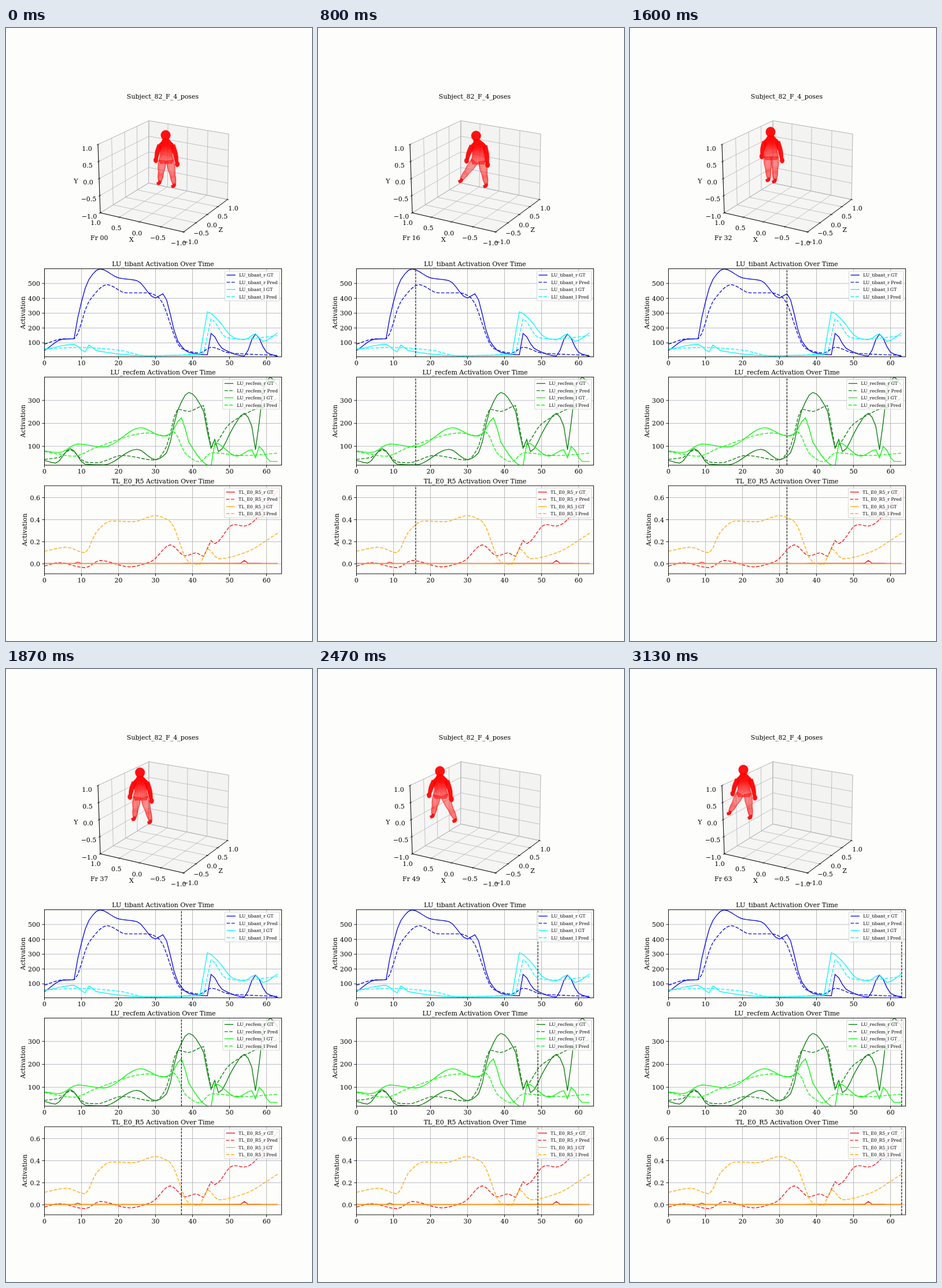
An HTML page for the animation above (3200 ms loop, 529 by 1058 pixels).

```html
<!DOCTYPE html>
<html lang="en">
<head>
<meta charset="utf-8">
<title>Muscle activation</title>
<style>
  html, body { margin: 0; width: 100%; height: 100%; overflow: hidden; background: #fdfdfc; }
  svg { display: block; }
  text { font: 11px "DejaVu Serif", "Noto Serif", serif; }
  .small { font-size: 7.7px; }
</style>
</head>
<body>
<svg id="stage" width="100%" height="100%" viewBox="0 0 529 1058">
  <linearGradient id="skin" x2="0" y2="1">
    <stop offset=".3" stop-color="#f00" stop-opacity=".9"/>
    <stop offset=".65" stop-color="#f00" stop-opacity=".5"/>
    <stop offset="1" stop-color="#f00" stop-opacity=".15"/>
  </linearGradient>
</svg>
<script>
const stage = document.getElementById('stage');

function add(parent, tag, attrs, content) {
  const node = document.createElementNS('http://www.w3.org/2000/svg', tag);
  for (const key in attrs) node.setAttribute(key, attrs[key]);
  if (content !== undefined) node.textContent = content;
  return parent.appendChild(node);
}
const label = (x, y, content, anchor = 'middle', attrs = {}) =>
  add(stage, 'text', { x, y, 'text-anchor': anchor, ...attrs }, content);
const polyline = pts => 'M' + pts.map(p => p[0].toFixed(2) + ' ' + p[1].toFixed(2)).join('L');
const stroke = (parent, d, color, width, attrs = {}) =>
  add(parent, 'path', { d, stroke: color, 'stroke-width': width, fill: 'none', ...attrs });
const mix = (p, q, t) => p.map((v, i) => v + (q[i] - v) * t);
const signed = v => v.toFixed(1).replace('-', '\u2212');

// Monotone cubic curve through [x, y] points.
function curve(points) {
  const last = points.length - 1;
  const secant = points.slice(1).map(([x, y], i) => (y - points[i][1]) / (x - points[i][0]));
  const slope = points.map((_, i) => {
    if (i === 0 || i === last) return secant[Math.min(i, last - 1)];
    const a = secant[i - 1], b = secant[i];
    return a * b > 0 ? 2 * a * b / (a + b) : 0;
  });
  return x => {
    let i = 0;
    while (i < last - 1 && x > points[i + 1][0]) i++;
    const [x0, y0] = points[i], [x1, y1] = points[i + 1], h = x1 - x0, t = (x - x0) / h, u = 1 - t;
    return u * u * ((1 + 2 * t) * y0 + t * h * slope[i]) + t * t * ((1 + 2 * u) * y1 - u * h * slope[i + 1]);
  };
}

// ---------- 3D axes ----------
const corner = {
  leftTop: [159, 201], backTop: [247, 160], rightTop: [385, 183],
  left: [163, 319], back: [246.5, 267.5], right: [383, 296], front: [307, 352]
};
// Five tick points along an edge; ratio sets the foreshortening.
const ticksOn = (a, b, ratio) => [0, .25, .5, .75, 1].map(t =>
  mix(corner[a], corner[b], t / (t + (1 - t) * ratio)));

function drawBox() {
  const pane = (names, fill) => add(stage, 'path', {
    d: polyline(names.map(n => corner[n])) + 'Z', fill, stroke: '#d4d4d4', 'stroke-width': 1 });
  pane(['leftTop', 'backTop', 'back', 'left'], '#f6f6f4');
  pane(['backTop', 'rightTop', 'right', 'back'], '#f3f3f2');
  pane(['left', 'back', 'right', 'front'], '#f5f5f4');

  const yLeft = ticksOn('leftTop', 'left', 1), yBack = ticksOn('backTop', 'back', 1),
        yRight = ticksOn('rightTop', 'right', 1),
        xFront = ticksOn('left', 'front', 1.12), xBack = ticksOn('back', 'right', 1.06),
        xTop = ticksOn('backTop', 'rightTop', 1.06),
        zFront = ticksOn('front', 'right', .86), zBack = ticksOn('left', 'back', .91),
        zTop = ticksOn('leftTop', 'backTop', .91);
  const tick = ([x, y], dx, dy) => stroke(stage, polyline([[x - dx, y - dy], [x + dx, y + dy]]), '#000', .8);

  for (let i = 0; i < 5; i++)
    for (const line of [[yLeft[i], yBack[i], yRight[i]], [xFront[i], xBack[i], xTop[i]], [zFront[i], zBack[i], zTop[i]]])
      stroke(stage, polyline(line), '#b4b4bc', .8);
  stroke(stage, polyline(['leftTop', 'left', 'front', 'right'].map(n => corner[n])), '#000', .95);
  for (let i = 0; i < 5; i++) {
    const value = signed(1 - i / 2);
    tick(yLeft[i], 2, -1);
    tick(xFront[i], 1.6, -1.2);
    tick(zFront[i], 2, .6);
    label(140 + i, 211.5 + 29.3 * i, value);
    label(155 + 35.8 * i, 340 + 8.75 * i, value);
    label(393 - 18.5 * i, 315 + 14.4 * i, value);
  }
  label(271, 122, 'Subject_82_F_4_poses');
  label(121, 268, 'Y');
  label(217, 369, 'X');
  label(371, 352, 'Z');
}

// ---------- charts ----------
const LEFT = 66.5, WIDTH = 410, HEIGHT = 152, STEP = 6.4, LAST = 63;
const cursors = [];

function drawChart({ top, muscle, zero, unit, tickStep, tickFrom, tickTo, labelX, legendX, colors, series }) {
  const bottom = top + HEIGHT, yOf = v => zero - v * unit;
  const plot = add(stage, 'svg', { x: LEFT, y: top, width: WIDTH, height: HEIGHT,
    viewBox: [LEFT, top, WIDTH, HEIGHT].join(' ') });

  for (let v = 0; v <= 60; v += 10) {
    const x = LEFT + v * STEP;
    stroke(plot, `M${x} ${top}V${bottom}`, '#b4b4b0', .9);
    stroke(stage, `M${x} ${bottom}v4`, '#000', .9);
    label(x, bottom + 14.7, v);
  }
  for (let v = tickFrom; v < tickTo + tickStep / 2; v += tickStep) {
    const y = yOf(v);
    stroke(plot, `M${LEFT} ${y}h${WIDTH}`, '#b4b4c4', .9);
    stroke(stage, `M${LEFT} ${y}h-4`, '#000', .9);
    label(59, y + 4, tickStep < 1 ? v.toFixed(1) : v, 'end');
  }

  const styles = series.map((_, i) =>
    [colors[i >> 1], 1.4, i % 2 ? { 'stroke-dasharray': '5.8 2.5' } : {}]);
  series.forEach((points, i) => {
    const valueAt = curve(points);
    const pts = Array.from({ length: LAST + 1 }, (_, x) => [LEFT + x * STEP, yOf(valueAt(x))]);
    stroke(plot, polyline(pts), ...styles[i]);
  });
  cursors.push(stroke(plot, `M${LEFT} ${bottom}V${top}`, '#000', 1.1, { 'stroke-dasharray': '4.07 1.76' }));
  add(stage, 'rect', { x: LEFT, y: top, width: WIDTH, height: HEIGHT, fill: 'none', stroke: '#000', 'stroke-width': .9 });

  add(stage, 'rect', { x: legendX, y: top + 4, width: 472.7 - legendX, height: 51.5, rx: 1.5,
    fill: '#fff', 'fill-opacity': .8, stroke: '#ccc', 'stroke-opacity': .8, 'stroke-width': 1 });
  ['r GT', 'r Pred', 'l GT', 'l Pred'].forEach((name, i) => {
    const y = top + 11 + 12.4 * i;
    stroke(stage, `M${legendX + 3.1} ${y}h15.4`, ...styles[i]);
    label(legendX + 24.7, y + 2.8, `${muscle}_${name}`, 'start', { class: 'small' });
  });
  label(LEFT + WIDTH / 2, top - 4.5, muscle + ' Activation Over Time');
  label(0, 0, 'Activation', 'middle', { transform: `translate(${labelX} ${top + HEIGHT / 2}) rotate(-90)` });
}

// Each series: a few turning points [frame, activation].
const charts = [{
  top: 415.5, muscle: 'LU_tibant', zero: 569.1, unit: .2563, tickFrom: 100, tickTo: 500, tickStep: 100,
  labelX: 33, legendX: 378.3, colors: ['#1414dc', '#14f5ff'],
  series: [
    [[0, 48], [5, 125], [8, 128], [9, 270], [12, 527], [15, 598], [20, 538], [25, 519], [30, 402], [32, 431],
      [36, 114], [39, 36], [44, 20], [45, 164], [48, 63], [54, 12], [57, 160], [60, 36], [63, 8]],
    [[0, 92], [5, 127], [8, 128], [12, 379], [17, 492], [22, 437], [28, 437], [31, 402], [37, 63], [42, 32],
      [45, 71], [50, 32], [63, 15]],
    [[0, 55], [8, 90], [11, 40], [12, 86], [14, 48], [27, 14], [42, 20], [44, 309], [47, 250], [51, 137], [54, 121],
      [57, 160], [59, 110], [63, 168]],
    [[0, 60], [10, 69], [20, 51], [28, 12], [43, 30], [45, 262], [49, 137], [53, 125], [63, 149]]
  ]
}, {
  top: 602.5, muscle: 'LU_recfem', zero: 761.6, unit: .396, tickFrom: 100, tickTo: 300, tickStep: 100,
  labelX: 33, legendX: 374.6, colors: ['#148214', '#14f514'],
  series: [
    [[0, 39], [3, 27], [7, 90], [11, 22], [16, 19], [25, 87], [30, 42], [33, 72], [36, 257], [39, 335], [43, 252],
      [45, 92], [46, 130], [47, 77], [51, 183], [54, 244], [56, 188], [57, 85], [59, 345], [61, 402], [63, 363]],
    [[0, 43], [4, 52], [7, 85], [11, 32], [14, 28], [21, 60], [30, 40], [33, 100], [36, 262], [39, 252], [43, 277],
      [45, 97], [50, 198], [63, 310]],
    [[0, 80], [4, 73], [9, 110], [16, 97], [26, 181], [32, 145], [34, 155], [37, 224], [39, 118], [45, 14], [46, 115],
      [52, 57], [56, 85], [57, 50], [58, 100], [61, 34], [63, 34]],
    [[0, 77], [8, 57], [14, 95], [28, 158], [33, 145], [35, 163], [38, 70], [42, 32], [45, 72], [54, 60], [63, 70]]
  ]
}, {
  top: 790, muscle: 'TL_E0_R5', zero: 924.8, unit: 190.5, tickFrom: 0, tickTo: .6, tickStep: .2,
  labelX: 36, legendX: 377.4, colors: ['#f01e1e', '#ffaf14'],
  series: [
    [[0, .003], [8, .003], [9, .015], [10, .003], [53, .005], [54, .03], [55, .005], [63, .003]],
    [[0, -.02], [4, .01], [11, -.035], [15, .03], [23, -.027], [29, .025], [34, .172], [38, .072], [41, .1], [43, .067],
      [45, .21], [46, .183], [51, .356], [54, .342], [63, .66]],
    [[0, .002], [63, .001]],
    [[0, .114], [6, .15], [11, .1], [14, .288], [18, .388], [24, .382], [30, .437], [34, .382], [39, .015], [42, -.006],
      [44, .14], [47, .046], [54, .1], [63, .277]]
  ]
}];

// ---------- walking figure ----------
const bodyX = curve([[0, 277], [14, 279], [23, 260], [32, 244], [43, 220], [56, 204], [63, 197]]);
const swing = (frame, from, to) => {
  const t = Math.max(0, Math.min(1, (frame - from) / (to - from)));
  return t * t * (3 - 2 * t);
};
const footL = f => 266 - 26 * swing(f, 4, 23) - 41 * swing(f, 32, 43) - 42 * swing(f, 56, 68);
const footR = f => 291 - 41 * swing(f, 22, 33) - 41 * swing(f, 45, 56);

// Each leg stays planted while the other swings; both follow the same ground line.
function poseOf(frame) {
  const x = bodyX(frame), walked = 277 - x, left = footL(frame), right = footR(frame);
  const spread = right - left - 25, bob = spread * .06;
  const lean = 3 * swing(frame, 8, 16) * (1 - swing(frame, 17, 24));
  const at = (dx, y, rise) => [x + dx, y - walked * rise + bob];
  return {
    head: at(-1 - lean, 185, .145), chest: at(0, 203, .15), pelvis: at(0, 228, .175),
    handL: at(-18 - spread * .13, 228, .17), handR: at(19 - lean, 235, .17),
    ankleL: [left, 265 - (266 - left) * .2], ankleR: [right, 270 - (291 - right) * .2]
  };
}

const figure = add(stage, 'g', { fill: '#f00', stroke: '#f00', 'stroke-linejoin': 'round' });
const layer = (fillOpacity, width, attrs = {}) =>
  add(figure, 'path', { 'fill-opacity': fillOpacity, 'stroke-width': width, ...attrs });
const layers = {
  legs: layer(.16, .5), legMesh: layer(0, .42), torso: layer(1, .2, { fill: 'url(#skin)' }),
  torsoMesh: layer(0, .42), solid: layer(.93, .4)
};
const frameLabel = label(146, 366, '', 'start');

// Tube through [x, y, radius] nodes, as an outline and a wire mesh.
function tube(nodes, wires, level) {
  const [cx, cy, cr] = [0, 1, 2].map(axis => curve(nodes.map((node, i) => [i, node[axis]])));
  const count = (nodes.length - 1) * 5;
  const sides = Array.from({ length: count + 1 }, (_, s) => {
    const t = s / 5, r = cr(t);
    const dx = level ? 0 : cx(t + .05) - cx(t - .05), dy = level ? 1 : cy(t + .05) - cy(t - .05);
    const len = Math.hypot(dx, dy) || 1;
    return u => [cx(t) - dy / len * r * u, cy(t) + dx / len * r * u];
  });
  const edge = u => sides.map(side => side(u));
  let mesh = '';
  for (let k = 1; k < wires; k++) mesh += polyline(edge(Math.cos(Math.PI * k / wires)));
  for (const side of sides) mesh += polyline([side(-1), side(1)]);
  return { outline: polyline([...edge(1), ...edge(-1).reverse()]) + 'Z', mesh };
}
const ellipse = (x, y, rx, ry) => `M${x - rx} ${y}a${rx} ${ry} 0 1 0 ${2 * rx} 0a${rx} ${ry} 0 1 0 ${-2 * rx} 0Z`;

function drawFigure(frame) {
  const pose = poseOf(frame);
  const [hx, hy] = pose.head, [cx, cy] = pose.chest, [px, py] = pose.pelvis;
  const torso = tube([[hx, hy + 6, 4.5], [cx, cy - 6, 9], [cx, cy - 2, 12.5], [cx, cy + 6, 11.5],
    [...mix(pose.chest, pose.pelvis, .6), 10.5], [px, py - 1, 12.5], [px, py + 6, 10]], 12, true);
  let solid = ellipse(hx, hy, 8.3, 8.6), legs = '', legMesh = '';

  for (const [side, sign] of [['L', -1], ['R', 1]]) {
    const hand = pose['hand' + side], ankle = pose['ankle' + side], [ax, ay] = ankle;
    const shoulder = [cx + sign * 11, cy - 1], hip = [px + sign * 6.5, py + 1];
    const elbow = mix(shoulder, hand, .5), knee = mix(hip, ankle, .58);
    solid += tube([[...shoulder, 4.2], [elbow[0] + sign, elbow[1], 3.9], [...mix(elbow, hand, .8), 2.8]], 3).outline
      + ellipse(...hand, 3.8, 4.8)
      + tube([[ax + 1, ay - 1, 1.8], [ax - 1, ay + 2.5, 2.8], [ax - 5, ay + 4, 2.2]], 3).outline;
    const leg = tube([[...hip, 6.5], [...mix(hip, knee, .5), 6.4], [...knee, 4.7],
      [...mix(knee, ankle, .4), 4.5], [ax, ay, 2.6]], 9);
    legs += leg.outline;
    legMesh += leg.mesh;
  }
  const paths = { legs, legMesh, torso: torso.outline, torsoMesh: torso.mesh, solid };
  for (const name in paths) layers[name].setAttribute('d', paths[name]);
}

drawBox();
stage.append(figure, frameLabel);
charts.forEach(drawChart);

// 48 pictures per 3.2 s loop, sampled from 64 pose frames on a 10 ms clock.
let shown = -1;
function play(now) {
  const hundredths = Math.floor(now % 3200 / 10);
  const frame = Math.round(Math.floor((hundredths + .34) * .15) * 4 / 3);
  if (frame !== shown) {
    shown = frame;
    drawFigure(frame);
    frameLabel.textContent = 'Fr ' + String(frame).padStart(2, '0');
    for (const cursor of cursors) cursor.setAttribute('transform', `translate(${frame * STEP} 0)`);
  }
  requestAnimationFrame(play);
}
play(performance.now());
</script>
</body>
</html>
```
